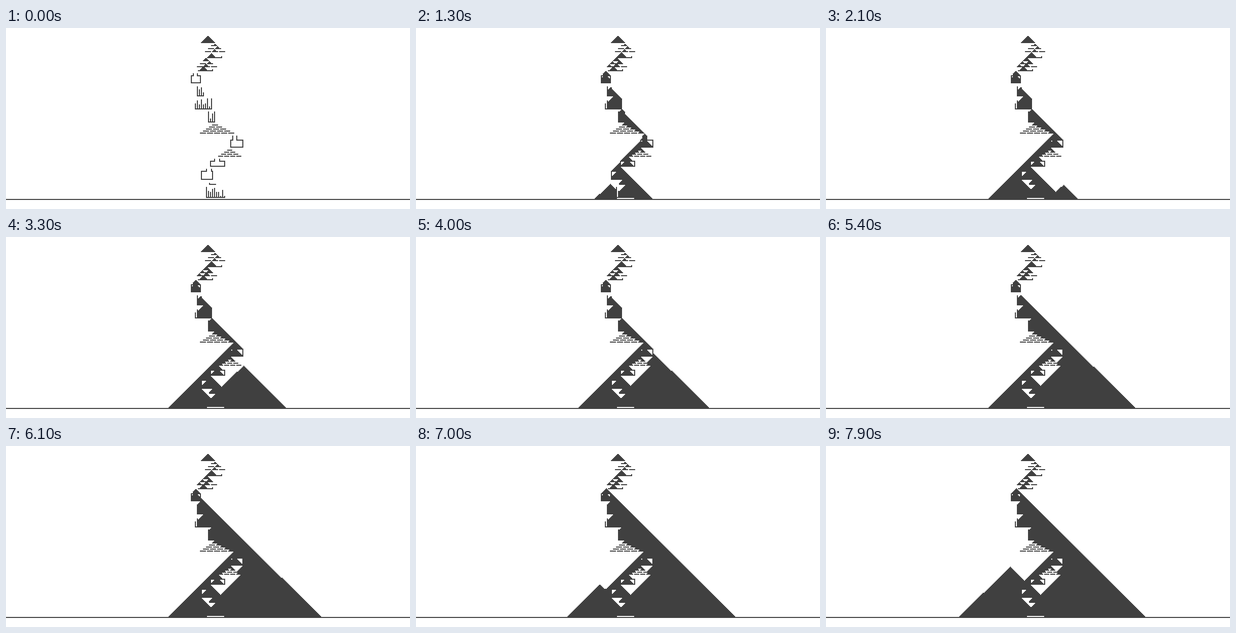
An HTML page with a canvas that plays this animation: 800 px wide and 360 px high, repeating every 8 s.

```html
<!DOCTYPE html>
<html lang="en">
<head>
<meta charset="utf-8">
<title>Falling sand</title>
<style>
  html, body { margin: 0; width: 100%; height: 100%; overflow: hidden; background: #fff; }
  canvas { display: block; }
</style>
</head>
<body>
<canvas id="stage" width="800" height="360"></canvas>
<script>
const CELL = 2, COLS = 400, ROWS = 180;
const SOURCE = 200, FLOOR = 170;
const LOOP = 8000, STEP = 100, PER_STEP = 100;
const TOTAL = LOOP / STEP * PER_STEP;

const solid = new Uint8Array(COLS * ROWS);
const rocks = [];

function rock(x, y) {
  if (solid[y * COLS + x]) return;
  solid[y * COLS + x] = 1;
  rocks.push([x, y]);
}

// Straight wall between two cells, both ends included
function wall(x1, y1, x2, y2) {
  const n = Math.max(Math.abs(x2 - x1), Math.abs(y2 - y1));
  const dx = Math.sign(x2 - x1), dy = Math.sign(y2 - y1);
  for (let i = 0; i <= n; i++) rock(x1 + dx * i, y1 + dy * i);
}

// Stacked rows of dashes; each row has one dash more than the one above
function dashes(x, y, rows, width, gapY) {
  for (let r = 0; r < rows; r++) {
    for (let i = 0; i <= r; i++) {
      const left = x - 3 * r + i * (width + 1);
      wall(left, y + r * gapY, left + width - 1, y + r * gapY);
    }
  }
}

function vase(left, right, neckL, neckR, rim, shoulder, base) {
  wall(neckL, rim, neckL, shoulder);
  wall(left, shoulder, neckL, shoulder);
  wall(left, shoulder, left, base);
  wall(left, base, right, base);
  wall(right, shoulder, right, base);
  wall(neckR, shoulder, right, shoulder);
  wall(neckR, rim, neckR, shoulder);
}

// Teeth two cells apart on a common base
function comb(x, base, tops) {
  wall(x, base, x + 2 * (tops.length - 1), base);
  tops.forEach((top, i) => wall(x + 2 * i, top, x + 2 * i, base));
}

function ledge(left, right, y, lip) {
  wall(left, y, right, y);
  rock(lip, y - 1);
}

wall(193, 14, 206, 14);
dashes(203, 17, 3, 6, 3);
ledge(199, 213, 29, 213);
dashes(195, 32, 3, 6, 3);
ledge(190, 204, 42, 204);
vase(183, 192, 185, 189, 45, 47, 54);
comb(189, 67, [58, 61, 59, 64]);
comb(187, 80, [75, 72, 76, 71, 76, 75, 70, 78, 70]);
comb(200, 93, [83, 90, 85, 83]);
dashes(204, 96, 5, 6, 2);
vase(222, 234, 224, 228, 107, 111, 118);
dashes(219, 121, 4, 5, 2);
vase(202, 216, 206, 211, 130, 132, 137);
vase(193, 204, 198, 203, 140, 142, 150);
ledge(201, 207, 155, 201);
comb(198, 168, [158, 162, 163, 160, 159, 163, 163, 167, 161, 167]);
wall(0, FLOOR, COLS - 1, FLOOR);

// A grain tries straight down, then down-left, then down-right
function drop() {
  let x = SOURCE, y = 0;
  for (;;) {
    const below = (y + 1) * COLS + x;
    if (!solid[below]) y++;
    else if (!solid[below - 1]) { x--; y++; }
    else if (!solid[below + 1]) { x++; y++; }
    else break;
  }
  solid[y * COLS + x] = 1;
  return [x, y];
}

const grains = Array.from({ length: TOTAL }, drop);

const ctx = document.getElementById("stage").getContext("2d");
let shown = Infinity;

function paint(cells) {
  for (const [x, y] of cells) ctx.fillRect(x * CELL, y * CELL, CELL, CELL);
}

function draw(time) {
  const count = PER_STEP * (1 + Math.floor((time % LOOP) / STEP));
  if (count === shown) return;
  ctx.fillStyle = "#404040";
  if (count < shown) {
    ctx.clearRect(0, 0, 800, 360);
    paint(rocks);
    shown = 0;
  }
  paint(grains.slice(shown, count));
  shown = count;
}

const start = performance.now();
function tick() {
  draw(performance.now() - start);
  requestAnimationFrame(tick);
}
tick();
</script>
</body>
</html>
```
